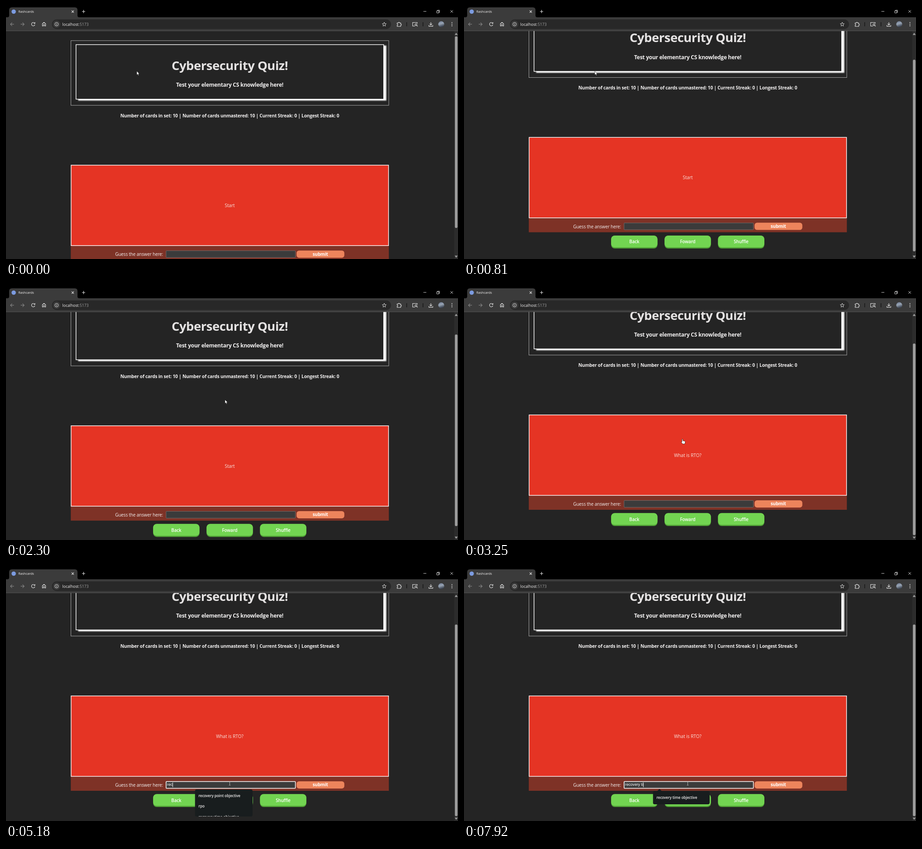
Recreate the animation shown at these times as an HTML page. Size 999x561 px, loop 8 s.

```html
<!DOCTYPE html>
<html lang="en">
<head>
<meta charset="utf-8">
<title>flashcards</title>
<style>
  html, body { margin: 0; width: 100%; height: 100%; overflow: hidden; background: #242424; }
  svg { display: block; }
  text { font-family: "Open Sans", "Noto Sans", sans-serif; fill: #f2f0f0; white-space: pre; }
  .mid { text-anchor: middle; }
  .title { font: 700 27.5px "Open Sans", "Noto Sans", sans-serif; letter-spacing: -.5px; fill: #e4e2e2; }
  .sub { font-weight: 700; font-size: 12px; letter-spacing: -.25px; }
  .stats { font-weight: 700; font-size: 10.2px; letter-spacing: -.22px; }
  .card { font-size: 10px; fill: #f8e4e0; }
  .label { font-size: 10px; letter-spacing: -.17px; }
  .submit { font-weight: 700; font-size: 10px; letter-spacing: -.2px; fill: #fff; }
  .btn { font-weight: 600; font-size: 9.8px; letter-spacing: -.1px; fill: #fff; }
  .typed { font: 8.67px "Liberation Sans", Arial, sans-serif; fill: #fff; }
  .item { font-weight: 600; font-size: 8.2px; letter-spacing: -.1px; }
  .tab { font-size: 7.4px; letter-spacing: -.08px; }
  .url { font-size: 8.7px; letter-spacing: -.03px; }
  .icon { fill: none; stroke: #e4e4e4; stroke-width: 1.1; }
  .dim { stroke: #858585; }
  .glow { filter: blur(1.3px); }
  .pop, .cur { visibility: hidden; }
  .on { visibility: visible; }
</style>
</head>
<body>
<svg id="stage" width="999" height="561" viewBox="0 0 999 561">
  <rect width="999" height="561" fill="#242424"/>

  <svg y="55" width="999" height="506" viewBox="0 55 999 506">
    <g id="page">
      <rect x="143.5" y="76.8" width="702.5" height="143.4" fill="none" stroke="#b5b5b5" stroke-width=".9"/>
      <rect class="glow" x="159.5" y="87.7" width="681" height="122" fill="#fff"/>
      <rect x="154.7" y="85.6" width="680" height="121" fill="#242424" stroke="#fff" stroke-width="1.4"/>
      <text class="mid title" x="494.5" y="142">Cybersecurity Quiz!</text>
      <text class="mid sub" x="494.5" y="179.2">Test your elementary CS knowledge here!</text>
      <text class="mid stats" x="494.5" y="246.8">Number of cards in set: 10 | Number of cards unmastered: 10 | Current Streak: 0 | Longest Streak: 0</text>

      <rect x="143.2" y="531" width="703" height="32.3" fill="#7e3226"/>
      <rect x="143.9" y="352.9" width="701.6" height="178.4" fill="#e53424" stroke="#fff" stroke-width="1.4"/>
      <text id="prompt" class="mid card" x="494.5" y="446"></text>

      <text class="label" x="241.3" y="554.2">Guess the answer here:</text>
      <rect id="field" x="353.8" y="542.7" width="285.8" height="15" rx="1" fill="#3b3b3b" stroke="#777" stroke-width=".8"/>
      <text id="typed" class="typed" x="356" y="552.7"></text>
      <rect id="caret" y="544.8" width=".9" height="10.5" fill="#fff"/>
      <rect x="642.2" y="542.2" width="105.6" height="16" rx="5.5" fill="#ed845c"/>
      <text class="mid submit" x="694.8" y="553.7">submit</text>
      <g id="buttons"></g>
    </g>
  </svg>

  <rect x="990.5" y="55" width="8.5" height="506" fill="#2c2c2c"/>
  <rect id="thumb" x="992.2" y="67.3" width="5.6" height="425" rx="2.8" fill="#9f9f9f"/>
  <path d="M991.8 64.2l3.2-5 3.2 5zM991.8 553.5l3.2 5 3.2-5z" fill="#9f9f9f"/>

  <rect width="999" height="25" fill="#000"/>
  <path d="M3 25q4 0 4-4V9q0-6 6-6h139q6 0 6 6v12q0 4 4 4z" fill="#3b3b3b"/>
  <rect y="25" width="999" height="30" fill="#3b3b3b"/>
  <rect y="54.6" width="999" height=".9" fill="#5c5c5c"/>
  <circle cx="17" cy="12.5" r="4.8" fill="#7c9be0"/>
  <text class="tab" x="27.3" y="15.2">flashcards</text>
  <rect x="101.5" y="29.8" width="749.5" height="21.4" rx="10.7" fill="#282828"/>
  <circle cx="111.8" cy="40.4" r="8" fill="#3b3b3b"/>
  <text class="url" x="124.5" y="43.6">localhost<tspan fill="#a0a0a0">:5173</tspan></text>

  <g class="icon">
    <path d="M145 9.8l5 5m0-5l-5 5M168 12.3h7m-3.5-3.5v7"/>
    <path d="M922.5 12h6.5M982.3 9.3l5.6 5.6m0-5.6l-5.6 5.6" stroke-width=".9"/>
    <path d="M952 10.8h4.6v4.6H952zM953.6 10.6V9.3h4.6v4.8h-1.4" stroke-width=".9"/>
    <path class="dim" d="M17.5 40.4H9.8m3.7-3.7l-3.7 3.7 3.7 3.7M32.5 40.4h7.7m-3.7-3.7l3.7 3.7-3.7 3.7"/>
    <path d="M63.2 38a3.8 3.8 0 1 0 .6 3.5M64 36v2.8h-2.8"/>
    <path d="M80.4 39.2l3.6-2.9 3.6 2.9v5h-2.4v-3h-2.4v3h-2.4z"/>
    <circle cx="111.8" cy="40.4" r="3.9" stroke-width=".9"/>
    <path d="M111.8 39.8v2.7m0-4.3v1" stroke-width="1"/>
    <path d="M836 36l1.2 3 3.2.3-2.5 2.1.8 3.2-2.7-1.7-2.7 1.7.8-3.2-2.5-2.1 3.2-.3z" stroke-width=".9"/>
    <path d="M864.5 37.5h2.6a1.4 1.4 0 0 1 2.8 0h2.5v2.4a1.5 1.5 0 0 1 0 3v2.3h-7.9v-2.4a1.3 1.3 0 0 0 0-2.8z"/>
    <path d="M904 44.5h-5.2v-8h10v2.4"/>
    <circle cx="906" cy="41.3" r="2"/>
    <path d="M907.5 42.8l2.3 2.2M939 36v6m-2.8-2.7l2.8 2.8 2.8-2.8M934.6 42.6v2.3h8.8v-2.3"/>
    <path d="M885.6 36v9M921.6 36v9" stroke="#151515" stroke-width="1.4"/>
  </g>
  <linearGradient id="sky" x2=".3" y2="1">
    <stop stop-color="#6d7a94"/><stop offset=".5" stop-color="#98a4b4"/><stop offset="1" stop-color="#39414f"/>
  </linearGradient>
  <circle cx="962" cy="40.3" r="6.6" fill="url(#sky)"/>
  <g fill="#e4e4e4">
    <circle cx="985.6" cy="36.8" r="1"/><circle cx="985.6" cy="40.4" r="1"/><circle cx="985.6" cy="44" r="1"/>
  </g>

  <g id="popups"></g>

  <g id="cursor">
    <path class="cur" id="arrow" d="M0 0v8.2l1.9-1.7 1.3 2.9 1.4-.6-1.3-2.8h2.6z" fill="#fff" stroke="#000" stroke-width=".5"/>
    <path class="cur" id="hand" d="M-1.3 1q1-1.5 2 0v3.2l4 .9q1.3.4 1.1 1.8l-.6 3.1-.7 1.3H.2L-2.9 7.5q-.2-1.6 1.6-.8z" fill="#fff" stroke="#000" stroke-width=".6"/>
    <path class="cur" id="beam" d="M-1.8-4h1.3l.5.4.5-.4h1.3M0-3.6v7.2M-1.8 4h1.3l.5-.4.5.4h1.3" fill="none" stroke="#c8c8c8" stroke-width=".8"/>
  </g>
</svg>

<script>
const LOOP = 8000, ROW = 23.5, MAX_SCROLL = 69.3;
const $ = id => document.getElementById(id);

$('buttons').innerHTML = ['Back', 'Foward', 'Shuffle'].map((name, i) => {
  const x = 325.2 + i * 118.1;
  return `<rect x="${x}" y="571" width="102.4" height="28.4" rx="8" fill="#4f9e35"/>
    <rect x="${x}" y="570.5" width="102.4" height="26.4" rx="8" fill="#72d451"/>
    <text class="mid btn" x="${x + 51.2}" y="588">${name}</text>`;
}).join('');

// Autocomplete lists
const POINT = 'recovery point objective', TIME = 'recovery time objective';
const FOUND = [POINT, 'rpo', TIME];
const HISTORY = [...FOUND, 'firewall', 'phishing', 'confidentiality integrity availability'];
const popups = [
  { items: HISTORY, w: 160, arrow: 'down', spans: [[4850, 4930]] },
  { items: FOUND, w: 127.5, arrow: 'down', spans: [[4930, 5180]] },
  { items: FOUND, w: 127.5, h: 60, spans: [[5180, 5290]] },
  { items: [POINT, TIME], w: 127.5, arrow: 'up', spans: [[5290, 5950], [6060, 7820]] },
  { items: [TIME], w: 125.5, arrow: 'up', spans: [[7880, LOOP]] }
];

function popupMarkup({ items, w, h = 29 + ROW * (items.length - 1), arrow }) {
  const top = arrow === 'down' ? 467 - h : arrow === 'up' ? 495 : 491;
  const tip = arrow === 'down' ? 'M426 466.5l6 5 6-5z' : arrow === 'up' ? 'M426 495.5l6-5.5 6 5.5z' : '';
  const rows = items.map((s, i) => `<text class="item" x="8" y="${16.8 + i * ROW}">${s}</text>`).join('');
  return `<g class="pop"><path d="${tip}" fill="#181d1e"/>
    <svg x="417.5" y="${top}" width="${w}" height="${h}">
      <rect width="${w}" height="${h}" rx="4" fill="#181d1e"/>${rows}
    </svg></g>`;
}
$('popups').innerHTML = popups.map(popupMarkup).join('');
const popupNodes = [...$('popups').children];

// Keys are [time, ...values]
const scrollKeys = [[0, 0], [315, 0], [550, 36.5], [810, 61.5], [880, MAX_SCROLL],
  [1140, MAX_SCROLL], [1270, 0], [2190, 0], [2360, MAX_SCROLL]];
const cursorKeys = [[0, 289, 144.5], [1500, 289, 144.5], [1530, 246.5, 165.8], [1580, 127, 130],
  [1660, 250, 26], [1740, 560, 40], [1800, 832, 200], [1860, 700, 396], [1920, 520, 330],
  [1960, 484, 250], [2690, 484, 250], [2860, 483, 337], [3250, 483, 337], [3300, 490, 321],
  [3400, 704, 400], [3500, 640, 516], [3620, 329, 514], [3740, 420, 476], [3840, 494.5, 477.7]];
const ANSWER = 'recovery ti';
const keyTimes = [4930, 5020, 5180, 5420, 5950, 7410, 7480, 7550, 7720, 7820, 7920];

function sample(keys, t) {
  const i = keys.findIndex(k => k[0] > t);
  if (i < 0) return keys[keys.length - 1].slice(1);
  const a = keys[i - 1], b = keys[i], p = (t - a[0]) / (b[0] - a[0]);
  return a.slice(1).map((v, n) => v + (b[n + 1] - v) * p);
}
const within = (v, a, b) => v >= a && v < b;

function pointer(x, y) {
  if (within(x, 353, 640) && within(y, 542, 558)) return 'beam';
  const onCard = within(x, 143, 846) && within(y, 352, 532);
  const onSubmit = within(x, 642, 748) && within(y, 542, 558);
  const onButton = within((x - 325 + 1181) % 118.1, 0, 102.4) && within(x, 325, 664) && within(y, 570, 599);
  return onCard || onSubmit || onButton ? 'hand' : 'arrow';
}

function draw(t) {
  const [scroll] = sample(scrollKeys, t);
  $('page').setAttribute('transform', `translate(0 ${-scroll})`);
  $('thumb').setAttribute('y', 67.3 + scroll * .838);
  $('prompt').textContent = t < 2870 ? 'Start' : 'What is RTO?';

  const focused = t >= 3840;
  $('field').setAttribute('stroke', focused ? '#fff' : '#777');
  $('field').setAttribute('stroke-width', focused ? 1.5 : .8);
  $('typed').textContent = ANSWER.slice(0, keyTimes.filter(k => k <= t).length);
  $('caret').setAttribute('x', 356 + $('typed').getComputedTextLength());
  const blink = within(t, 4320, 4850) || within(t, 6950, 7410);
  $('caret').setAttribute('opacity', focused && !blink ? 1 : 0);

  popups.forEach((p, i) =>
    popupNodes[i].classList.toggle('on', p.spans.some(([a, b]) => within(t, a, b))));

  const [x, y] = sample(cursorKeys, t);
  $('cursor').setAttribute('transform', `translate(${x} ${y})`);
  const shape = y < 55 ? 'arrow' : pointer(x, y + scroll);
  for (const id of ['arrow', 'hand', 'beam']) $(id).classList.toggle('on', id === shape);
}

const start = performance.now();
function tick() {
  draw((performance.now() - start) % LOOP);
  requestAnimationFrame(tick);
}
tick();
</script>
</body>
</html>
```
